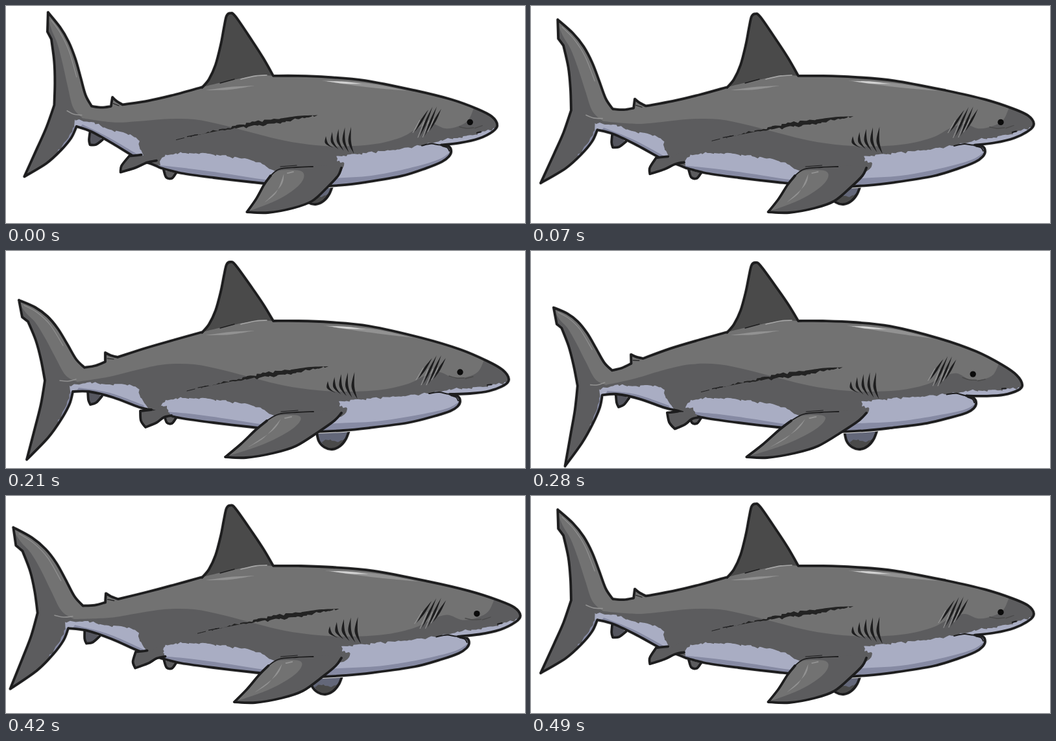
An HTML page for the animation above (560 ms loop, 800 by 335 pixels).

```html
<!DOCTYPE html>
<html lang="en">
<head>
<meta charset="utf-8">
<title>Swimming shark</title>
<style>
  html, body { margin: 0; width: 100%; height: 100%; overflow: hidden; background: #fff; }
  svg { display: block; width: 800px; height: 335px; }
  .pose { visibility: hidden; animation: show 560ms step-end infinite; }
  @keyframes show {
    0% { visibility: visible; }
    12.5%, 100% { visibility: hidden; }
  }
</style>
</head>
<body>
<svg id="stage" viewBox="0 0 800 335"></svg>
<script>
const INK = '#1d1d1e', DARK = '#4a4a4a', MID = '#5c5c5e', LIGHT = '#727272',
      SHINE = '#929292', BELLY = '#a9adc3', SHADE = '#868aa3', HALO = '#e4e4e4';
const STEPS = 8, STEP_MS = 70;

// Half the loop swings the tail down, the other half retraces it.
// The artwork is drawn at swing 3; sway and stretch are measured from there.
const swing = step => STEPS / 2 - Math.abs(STEPS / 2 - step);
const swayAt = k => -Math.cos(k * Math.PI / 4);
const stretchAt = k => 1 - Math.abs(k - 2) / 2;

function motions(step) {
  const k = swing(step);
  const sway = swayAt(k) - swayAt(3), stretch = stretchAt(k) - stretchAt(3);
  const slide = 13 * Math.cos((step - 1.2) * Math.PI / 4) - 5;

  const body = ([x, y]) => {
    const tail = Math.max(0, 260 - x) / 260, head = Math.max(0, x - 440) / 330;
    const tilt = .11 * (y - 212) * Math.min(1, 2 * tail);
    const lift = 43 * tail ** 1.7 + 11 * head ** 3 + Math.max(0, 110 - y) / 27;
    return [
      x + tilt * sway + (35 * head - 47 * tail ** 2.5) * stretch,
      y + lift * sway - 10 * head ** 5 * stretch
    ];
  };
  return {
    body,
    face: ([x, y]) => body([x, y]).map((v, i) => i ? v : v - 17 * sway),
    scratch: ([x, y]) => body([x, y]).map((v, i) => i ? v : v + slide),
    scar: ([x, y]) => [x + 33 * stretch, y + 5.5 * sway],
    pelvic: ([x, y]) => [x + (10 + (y - 247) / 2) * sway, y + 9 * sway],
    near: ([x, y]) => [x - 19.5 * (y - 250) / 68 * sway, y],
    far: ([x, y]) => [x + 15 * sway, y]
  };
}

const points = text => text.trim().split(/\s+/).map(p => p.split(',').map(Number));

function roughen(list) {
  let seed = 7;
  const jitter = () => ((seed = seed * 16807 % 2147483647) / 2147483647 - .5) * 4;
  const out = [list[0]];
  for (let i = 1; i < list.length; i++) {
    const [a, b] = list[i - 1], [c, d] = list[i];
    const count = Math.ceil(Math.hypot(c - a, d - b) / 4);
    for (let k = 1; k < count; k++)
      out.push([a + (c - a) * k / count + jitter(), b + (d - b) * k / count + jitter()]);
    out.push(list[i]);
  }
  return out;
}

// "|" makes a corner, "~" a ragged run; everything else is a smooth curve.
function trace(spec, move) {
  const out = p => p.map(v => v.toFixed(1)).join();
  let last = null, d = '';
  for (const part of spec.split('|')) {
    const ragged = part[0] === '~';
    let list = points(part.replace('~', ''));
    if (last) list.unshift(last);
    last = list[list.length - 1];
    if (ragged) list = roughen(list);
    const q = list.map(move);
    if (!d) d = 'M' + out(q[0]);
    for (let i = 1; i < q.length; i++) {
      if (ragged) { d += 'L' + out(q[i]); continue; }
      const a = q[i - 1], b = q[i], before = q[i - 2] || a, after = q[i + 1] || b;
      const c1 = a.map((v, k) => v + (b[k] - before[k]) / 6);
      const c2 = b.map((v, k) => v - (after[k] - a[k]) / 6);
      d += 'C' + [c1, c2, b].map(out).join(' ');
    }
  }
  return d;
}

const brush = move => ({
  fill: (spec, color) => `<path d="${trace(spec, move)}Z" fill="${color}"/>`,
  line: (spec, width = 3.8, color = INK) =>
    `<path d="${trace(spec, move)}" fill="none" stroke="${color}" stroke-width="${width}" stroke-linejoin="round" stroke-linecap="round"/>`
});

const dorsal = '303,125 313,113 323,92 331,63 336,38 340,21 346,17 354,22 380,58 397,83 412,108';

const outline = '20,76 45,87 64,101 80,120 94,143 108,167 121,180|138,177 153,171|153,157|161,161 172,164' +
  '|215,150 260,137 303,125|' + dorsal +
  '|450,108 500,110 560,116 640,134 700,152 742,170 766,184 775,198 768,207 745,216 715,220 684,221' +
  '|696,224 700,232 696,240 685,247 660,255 620,265 560,273 520,277 470,279 420,276 380,272 320,265 270,258 240,251' +
  '|225,246 205,241 165,226 128,217 103,217|98,236 85,260 65,288 32,322' +
  '|45,272 54,236 60,200|54,168 46,138 34,109|25,102|20,76';

const lightBack = '10,60|200,60|300,90|500,90|740,130|737,168' +
  '|728,186 712,194 690,196 668,187 645,193 620,205 580,214 530,217 480,215 430,208 385,197 335,184 290,175 245,175 200,184 160,194 110,202' +
  '|92,192 76,164 60,134 45,110 28,92 10,60';

const rearBelly = '98,208|~125,203 160,206 190,206 203,212 207,226 216,238|220,250 180,240 100,225';

const mainBelly = '240,252|238,242|~246,230 272,227 300,227 345,233 375,237 395,244 408,252|440,262 505,262' +
  '|~522,252 526,243 514,240 513,232 550,229 600,225 650,220|665,219 720,218|720,260 560,290 380,290 240,262';

const bellyShade = '235,247|290,252 340,259 400,268 450,270 510,266 570,263 630,254 680,243 702,230' +
  '|720,260 560,290 380,290 230,262';

function gills({ fill }) {
  let art = '';
  for (let i = 0; i < 5; i++) {
    const x = 496 + 10.3 * i, y = 201 - 7.5 * i + i * i;
    const endX = 508 + 8.5 * i, endY = 219 + 2.5 * i;
    const midX = (x + endX) / 2 - 6, midY = (y + endY) / 2 + 2;
    art += fill(`${x},${y} ${midX - 1},${midY} ${endX},${endY}|${midX + 3.5},${midY} ${x},${y}`, INK);
  }
  return art;
}

function drawBody({ body, face }, id) {
  const { fill, line } = brush(body), onFace = brush(face), eye = face([700, 187]);
  const rearFin = '126,214 127,230 130,237|139,234 148,224';
  const analFin = '244,254 248,265 256,266 262,258';
  return line(outline, 5.8, HALO) +
    fill(rearFin, '#55565f') + line(rearFin) + fill(analFin, MID) + line(analFin) +
    `<clipPath id="${id}"><path d="${trace(outline, body)}Z"/></clipPath><g clip-path="url(#${id})">` +
    fill(outline, MID) + fill(lightBack, LIGHT) +
    fill(dorsal + '|385,108 345,115 303,125', DARK) +
    fill(rearBelly, BELLY) +
    fill('112,211 160,219 212,238|212,250 160,234 105,222', SHADE) +
    fill('101,216|~94,234 80,264|96,250 101,216', SHADE) +
    fill(mainBelly, BELLY) + fill(bellyShade, SHADE) +
    fill('655,219|~690,213 735,210 755,206 772,203|775,215 740,225 690,223', BELLY) +
    line('28,84 48,95 68,114 88,146', 1.2, SHINE) +
    '</g>' + line(outline) +
    fill('308,130 345,125 383,123|345,129 308,130', SHINE) +
    fill('489,115 530,117 575,122 628,134|570,127 520,120 489,115', SHINE) +
    fill('497,116 525,117 555,121|525,120 497,116', '#d2d2d2') +
    line('362,113 385,108 402,107', 1.6, '#a6a6a6') + line('330,119 352,113', 1.3) +
    line('83,200 95,201 108,198', 1.6, SHINE) + line('156,166 166,167', 1.2) +
    line('652,220 668,218 684,221 715,220', 2) + line('686,223 694,226 697,231', 2) +
    line('742,207 748,206', 2.2) + gills({ fill }) +
    onFace.line('683,193 694,196 706,196', 1.5, DARK) + onFace.line('708,197 720,194', 1.3, DARK) +
    `<circle cx="${eye[0]}" cy="${eye[1]}" r="4.7" fill="#0b0b0b"/>`;
}

function drawPelvicFin({ pelvic }) {
  const { fill, line } = brush(pelvic);
  return fill('207,247|208,262 215,272|232,265 243,257 258,254|~250,249 248,239 236,240 232,246|207,247', MID) +
    line('224,245 207,247|208,262 215,272|232,265 243,257 255,254');
}

function drawNearFin({ near }) {
  const { fill, line } = brush(near);
  const edge = '402,262 385,276 362,298 338,318|370,319 412,312 447,301 482,279 506,262 517,250';
  return fill(edge + '|490,246 450,250 420,252 402,262', MID) +
    fill('402,262 385,276 362,298 338,318|395,299 435,279 453,263 450,254 420,254 402,262', LIGHT) +
    fill('373,303 398,288 424,259|411,277 373,303', SHINE) +
    line('430,258 440,256', 1.8, SHINE) +
    line(edge) + line('402,262 420,252 448,249 474,248', 1.8) + line('424,248 450,246', 1.2);
}

function drawFarFin({ far }) {
  const { fill, line } = brush(far), edge = '478,274 482,293 491,303 503,306 515,301 524,290 530,274';
  return line(edge, 5.8, HALO) + fill(edge, '#636779') +
    fill('486,294|~500,291 512,295 522,290|515,301 503,306 491,303', DARK) + line(edge);
}

function drawScar({ scar }) {
  const { fill, line } = brush(scar);
  return fill('300,211|~350,199 400,188 440,183|470,179 497,178|~465,184 430,191 390,196 350,201|300,211', '#232323') +
    line('279,216 291,213', 1) + line('296,211 312,208', 1.2);
}

function drawScratches({ scratch }) {
  const { fill, line } = brush(scratch);
  let art = '';
  for (let i = 0; i < 4; i++) {
    const bow = Math.sin(i * Math.PI / 3);
    const x = 638 + 8 * i, y = 198 + 9 * bow, endX = 660 + 7 * i, endY = 165 - 5 * bow;
    const midX = (x + endX) / 2, midY = (y + endY) / 2;
    art += line(`${x - 3},${y + 1} ${midX - 3},${midY - 1}`, 1, '#a0a0a0') +
      fill(`${x},${y} ${midX - 1.4},${midY - 1} ${endX},${endY}|${midX + 1.4},${midY + 1} ${x},${y}`, INK);
  }
  return art;
}

document.getElementById('stage').innerHTML = Array.from({ length: STEPS }, (_, step) => {
  const m = motions(step);
  return `<g class="pose" style="animation-delay:${(step - STEPS) * STEP_MS}ms">` +
    drawFarFin(m) + drawBody(m, 'body' + step) + drawPelvicFin(m) +
    drawScar(m) + drawScratches(m) + drawNearFin(m) + '</g>';
}).join('');
</script>
</body>
</html>
```
